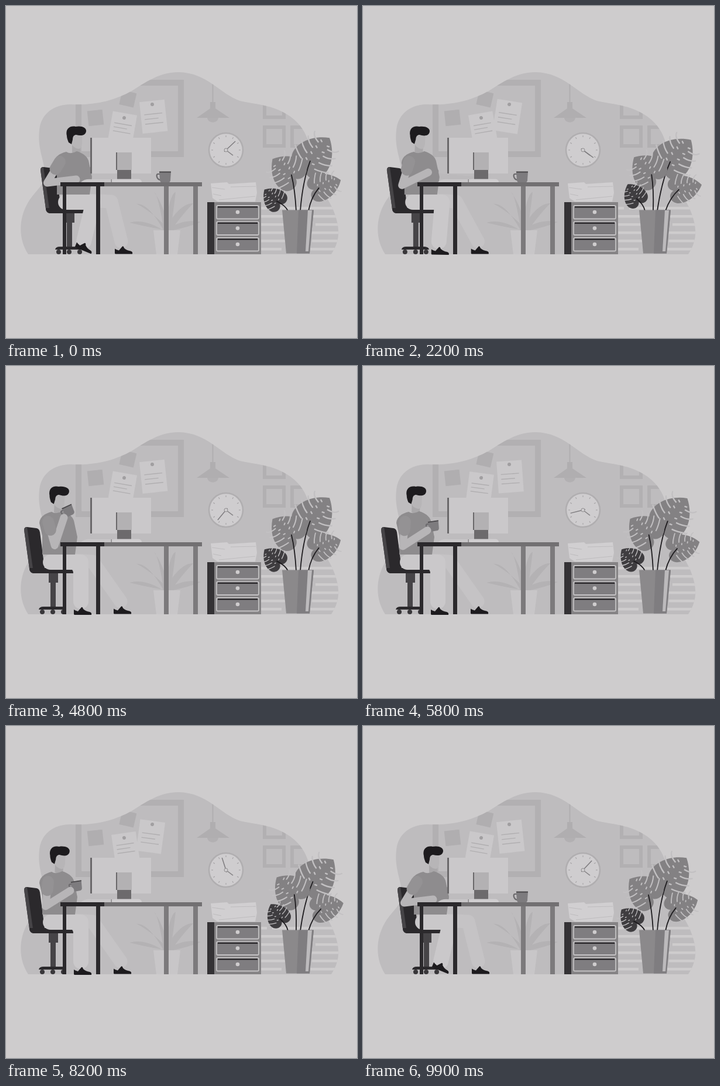
An HTML page for the animation above (10000 ms loop, 600 by 567 pixels).

```html
<!DOCTYPE html>
<html lang="en">
<head>
<meta charset="utf-8">
<title>Coffee break at the desk</title>
<style>
html, body { margin: 0; width: 100%; height: 100%; overflow: hidden; background: #cecccd; }
svg { display: block; width: 100%; height: 100%; }
</style>
</head>
<body>
<svg id="stage" viewBox="0 0 600 567"></svg>
<script>
const LOOP = 10000, STEP = 100, POT_TOP = 350;
const C = {
  bg: '#cecccd', blob: '#bebcbe', wall: '#b2b0b2', item: '#b0aeb0', note: '#cac8ca',
  shirt: '#8e8c8e', sleeve: '#949294', skin: '#b7b5b7', nearLeg: '#cac8ca', farLeg: '#c5c3c5',
  ink: '#1d1b1e', dark: '#2b292c', iron: '#464447', grey: '#858385', leaf: '#838183', darkLeaf: '#3f3d40'
};
const BLOB = 'M38 424C22 400 20 365 38 335C52 312 70 305 66 280C62 255 54 240 57 212C60 182 84 168 110 168C150 170 185 162 215 145C245 126 265 113 295 113C345 114 365 150 400 162C430 169 455 168 485 188C508 204 520 228 520 255C521 290 545 318 558 345C572 378 572 400 556 424Z';

const rect = (x, y, w, h, fill, extra = '') => `<rect x="${x}" y="${y}" width="${w}" height="${h}" fill="${fill}" ${extra}/>`;
const path = (d, fill, extra = '') => `<path d="${d}" fill="${fill}" ${extra}/>`;
const line = (d, color, width, extra = '') => `<path d="${d}" fill="none" stroke="${color}" stroke-width="${width}" ${extra}/>`;
const limb = (id, color, width) => line('', color, width, `id="${id}" stroke-linecap="round" stroke-linejoin="round"`);
const dot = (x, y, r, fill, extra = '') => `<circle cx="${x}" cy="${y}" r="${r}" fill="${fill}" ${extra}/>`;
const frame = (x, y, w, h, s) => rect(x + s / 2, y + s / 2, w - s, h - s, 'none', `stroke="${C.wall}" stroke-width="${s}"`);
const range = n => [...Array(n).keys()];
const mix = (a, b, k) => a + (b - a) * k;
const between = (p, q, k) => p.map((v, i) => mix(v, q[i], k));

function room() {
  const floor = range(6).map(i => {
    const y = 343 + i * 14, gap = 446 + (i * 37) % 80;
    return rect(436, y, gap - 436, 4.5, C.bg) + rect(gap + 9, y, 130, 4.5, C.bg);
  }).join('');
  return path(BLOB, C.blob) + `<g clip-path="url(#room)">`
    + frame(119, 126, 185, 132, 10)
    + rect(140, 178, 26, 26, C.item, 'transform="rotate(-6 153 191)"')
    + rect(196, 146, 25, 25, C.item, 'transform="rotate(13 208 158)"')
    + frame(439, 155, 39, 38, 6) + frame(439, 204, 39, 38, 6) + frame(486, 204, 39, 38, 6)
    + line('M353.5 130V168', C.item, 2)
    + path('M349 164H358V175L382 191H326L349 175Z', C.item)
    + path('M344 191H363C362 201 345 201 344 191Z', C.wall)
    + floor + '</g>';
}

function backPlant() {
  const fronds = range(6).map(i => {
    const a = (178 - i * 35) * Math.PI / 180;
    const x = 272 + 61 * Math.cos(a), y = 372 - 57 * Math.sin(a);
    const cx = mix(275, x, .55), cy = mix(372, y, .8);
    return path(`M270 384Q${cx - 3} ${cy - 8} ${x} ${y}Q${cx + 5} ${cy + 8} 281 384Z`, '#b4b2b4');
  });
  return fronds.join('') + path('M252 383H298L293 424H257Z', '#c8c6c8');
}

function note(id, w, h, top) {
  const rows = range(3).map(i => rect(-w * .36, top + h * (.4 + i * .15), w * (i === 1 ? .55 : .72), 1.4, C.item)).join('');
  return `<g id="${id}">${rect(-w / 2, top, w, h, C.note)}${rows}${dot(0, 0, 3, '#a19fa1')}</g>`;
}

function clock() {
  const ticks = range(12).map(i => line('M0-25V-22', '#a19fa1', 1, `transform="rotate(${i * 30})"`)).join('');
  return `<g transform="translate(376 246)">${dot(0, 0, 29, '#cfcdcf', `stroke="${C.item}" stroke-width="2.5"`)}${ticks}
    ${line('M0 0V-15', '#858385', 1.5, 'transform="rotate(127)"')}
    <g id="minute">${line('M0 4V-22', '#7d7b7e', 1.5)}</g>${dot(0, 0, 3, '#cfcdcf', 'stroke="#8f8d8f"')}</g>`;
}

function cabinet() {
  const drawers = range(3).map(i => {
    const y = 341 + i * 27.5;
    return rect(360, y, 72, 22.5, '#7f7d80', 'rx="2" stroke="#c3c1c3" stroke-width="1.8"')
      + rect(362, y + 1, 68, 2.5, C.dark) + dot(396, y + 11, 3.3, C.bg);
  });
  return path('M350 303L378 301L381 304L427 301L429 319L426 334H362L353 328Z', '#d1cfd1')
    + line('M352 310L374 313M427 308L384 309M354 321L368 324M364 331L426 325', C.blob, 1.2)
    + rect(344, 335, 92, 89, C.grey) + rect(344, 335, 12, 89, '#343235') + drawers.join('');
}

// Each leaf hangs on a stem from the pot; "lead" offsets its sway in time
const LEAVES = [
  { root: 503, at: [529, 254], turn: 40, wide: 1, long: 1.1, lead: 80 },
  { root: 496, at: [479, 281], turn: -50, wide: .9, long: .9, lead: 0 },
  { root: 517, at: [545, 307], turn: 70, wide: .7, long: .85, lead: 400 },
  { root: 482, at: [457, 328], turn: -47, wide: .6, long: .62, lead: -250, fill: C.darkLeaf }
];
function leaf({ root, at: [x, y], turn, wide, long, fill = C.leaf }, i) {
  const slits = [-1, 1].map(k => range(4).map(j => {
    const sy = 18 - j * 12, edge = 37 - j * 3.5;
    return `M${k * (15 - j * 1.5)} ${sy}Q${k * 24} ${sy - 2} ${k * edge} ${sy - 9}`
      + `M${k * 6} ${sy - 4}l${k * 3}-1`;
  }).join('')).join('');
  const a = turn * Math.PI / 180, reach = 13 * long;
  const ex = x - reach * Math.sin(a), ey = y + reach * Math.cos(a);
  return `<g id="leaf${i}"><g transform="translate(${x} ${y}) rotate(${turn}) scale(${wide} ${long})">
    ${path('M0 24C-6 37-26 36-32 21C-38 0-22-22 0-34C22-22 38 0 32 21C26 36 6 37 0 24Z', fill)}
    ${line(slits, '#c2c0c2', 2.2, 'stroke-linecap="round"')}</g>
    ${line(`M${root} ${POT_TOP}Q${mix(root, ex, .25)} ${mix(POT_TOP, ey, .6)} ${ex} ${ey}`, C.ink, 1.8, 'stroke-linecap="round"')}</g>`;
}
const pot = path('M472 348.500H526L519 422.500H479Z', '#8b898b') + path('M500 348.500H526L519 422.500H497Z', '#7f7d80')
  + path('M516 349H523L517 419H512Z', '#bcbabc');

const chair = path('M31 280Q31 275 36 275L52 277Q57 278 58 284L66 346H50Q41 354 40 346Z', C.dark)
  + path('M31 280Q31 275 36 275L46 346Q41 354 40 346Z', C.iron)
  + path('M40 345H108Q115 347 115 354H46Q40 353 40 345Z', C.dark)
  + rect(73, 354, 16, 16, C.iron) + rect(76, 370, 9, 42, C.iron)
  + path('M56 416Q57 411 64 411H96Q103 412 103 416Z', C.dark)
  + range(3).map(i => dot(62 + i * 18, 420, 4, '#39373a')).join('');

const shoe = path('M0 0V-8Q3-6 7-5L13-12Q15-13 16-9Q20-5 27-4Q31-3 30 1H1Z', C.ink);

const head = path('M-6-16H8V-1Q1 5-6 0Z', '#a9a7a9')
  + path('M-8-31H11V-15Q10-6 5-6Q-6-8-8-18Z', C.skin)
  + path('M-15-28C-18-40-10-46 0-44C9-46 19-43 18-36C17-28 8-28 1-30C-2-30-5-28-5-22L-7-14L-12-17C-14-22-15-25-15-28Z', C.ink);

const torso = path('M78 249Q86 254 96 248Q112 253 116 264L122 292L118 322H62V290L57 268Q58 254 78 249Z', C.shirt);

const mug = line('M-9-5H-13Q-15-4-14 0Q-12 5-8 5', '#6b696c', 2.2)
  + path('M-10-9H10L9 6Q8 10 4 10H-4Q-8 10-9 6Z', '#7d7b7e') + rect(-10, -9.5, 20, 2, '#4a484b');

const desk = rect(97, 308, 6, 116, C.dark) + rect(154, 308, 7, 116, C.dark)
  + rect(270, 308, 8, 116, '#7c7a7c') + rect(320, 308, 8, 116, '#7c7a7c')
  + rect(93, 301, 242, 7, '#727072') + rect(93, 301, 75, 7, C.dark);

const monitor = path('M128 301Q134 295 146 296H181V301Z', '#c8c6c8')
  + rect(145, 225, 103, 61, C.note) + rect(144, 225, 3, 61, '#6a686a')
  + rect(188, 250, 27, 30, '#b3b1b3') + rect(188, 250, 2, 30, '#6a686a') + rect(190, 280, 24, 16, '#6c6a6c')
  + path('M180 301V297Q182 295.500 188 295.500H226Q232 296 232 301Z', '#d0ced0') + rect(179.5, 296, 1.5, 5, '#8a888a');

const stage = document.getElementById('stage');
stage.innerHTML = `<defs><clipPath id="room"><path d="${BLOB}"/></clipPath></defs>`
  + rect(0, 0, 600, 567, C.bg) + room() + note('noteA', 42, 46, -8) + note('noteB', 43, 54, -6) + clock() + backPlant()
  + `<g id="chair">${chair}</g>` + limb('farLeg', C.farLeg, 23) + limb('nearLeg', C.nearLeg, 26)
  + `<g id="farShoe">${shoe}</g><g id="nearShoe">${shoe}</g>`
  + limb('farSleeve', C.shirt, 15) + limb('farArm', '#bbb9bb', 9)
  + `<g id="head">${head}</g><g id="torso">${torso}</g><g id="mug">${mug}</g>`
  + limb('nearArm', C.skin, 13) + limb('nearSleeve', C.sleeve, 20)
  + desk + monitor + cabinet() + LEAVES.map(leaf).join('') + pot;

const el = {};
stage.querySelectorAll('[id]').forEach(n => el[n.id] = n);
const put = (id, x, y, turn = 0, scale = 1) =>
  el[id].setAttribute('transform', `translate(${x} ${y}) rotate(${turn}) scale(${scale})`);
const draw = (id, ...points) => el[id].setAttribute('d', 'M' + points.join('L'));

const cubic = p => p < .5 ? 4 * p ** 3 : 1 - 4 * (1 - p) ** 3;
const rise = (t, a, b) => cubic(Math.min(1, Math.max(0, (t - a) / (b - a))));
// 0 to 1 between a and b, back to 0 between c and d
const pulse = (t, a, b, c, d) => rise(t, a, b) - rise(t, c, d);

function sway(t) {
  const p = ((t + 5000) % 5000) / 2500;
  return 1 - 2 * cubic(p < 1 ? p : 2 - p);
}

function elbow([sx, sy], [hx, hy], upper, fore) {
  const d = Math.min(Math.hypot(hx - sx, hy - sy), upper + fore);
  const bend = Math.acos((upper ** 2 + d ** 2 - fore ** 2) / (2 * upper * d));
  const a = Math.atan2(hy - sy, hx - sx) + bend;
  return [sx + upper * Math.cos(a), sy + upper * Math.sin(a)];
}

function renderRoom(t) {
  const w = sway(t);
  put('minute', 0, 0, 47 + t * 360 / LOOP);
  put('noteA', 202, 191, 10 * w);
  put('noteB', 250, 168, 1.5 - 7.5 * w);
  LEAVES.forEach(({ root, at, lead }, i) => {
    const widest = 6 / (POT_TOP - at[1]) * 180 / Math.PI;
    el['leaf' + i].setAttribute('transform', `rotate(${widest * (1 - sway(t + lead)) / 2} ${root} ${POT_TOP})`);
  });
}

function renderMan(t) {
  const near = 1 - pulse(t, 1700, 2600, 9000, 9700);
  const lean = pulse(t, 1600, 2500, 9000, 9700);
  const grab = pulse(t, 1900, 2500, 9100, 9700);
  const hold = pulse(t, 2500, 3200, 8500, 9100);
  const sip = pulse(t, 3900, 4600, 5200, 5800);
  const relax = pulse(t, 5500, 6400, 7700, 8400);

  put('chair', 28 * near, 0);
  put('torso', 25 * near, 0);
  put('head', 119 - 29 * lean - 2 * sip - 6 * relax, 250, 3 * lean - 11 * relax);
  draw('nearLeg', [76 + 26 * near, 335], [128 + 21 * near, 335], [128 + 5 * near, 402]);
  draw('farLeg', [110 + 26 * near, 332], [148 + 32 * near, 334], [196 + near, 402]);
  put('nearShoe', 116 + 2 * near, 424 - 13 * near ** 3, 22 * near ** 3);
  put('farShoe', 184 + 2 * near, 422.5);

  const [mx, my] = between([272, 292], [121 - 14 * sip, 273 - 26 * sip], hold);
  put('mug', mx, my, -10 * (hold - relax) - 15 * sip, 1 - .1 * hold);

  const typing = t < 1500 ? 1.5 * Math.sin(t * Math.PI / 150) : 0;
  const hand = [120 - 10 * lean - 11 * sip + typing, 296 - 14 * lean - 23 * sip - 9 * relax];
  const shoulder = [72 + 20 * near, 266];
  const joint = elbow(shoulder, hand, 42, 50);
  draw('nearArm', shoulder, joint, hand);
  draw('nearSleeve', shoulder, between(shoulder, joint, .34));

  const cuff = [112 + 28 * near, 283];
  draw('farSleeve', [cuff[0] - 13, 267], cuff);
  draw('farArm', cuff, [cuff[0] + 3, 290], between([130, 296], [mx - 3, my + 5], grab));
}

const start = performance.now();
function tick() {
  const step = Math.floor((performance.now() - start) % LOOP / STEP) * STEP;
  const t = step < 200 ? 0 : step;
  renderRoom(t);
  renderMan(t);
  requestAnimationFrame(tick);
}
tick();
</script>
</body>
</html>
```
